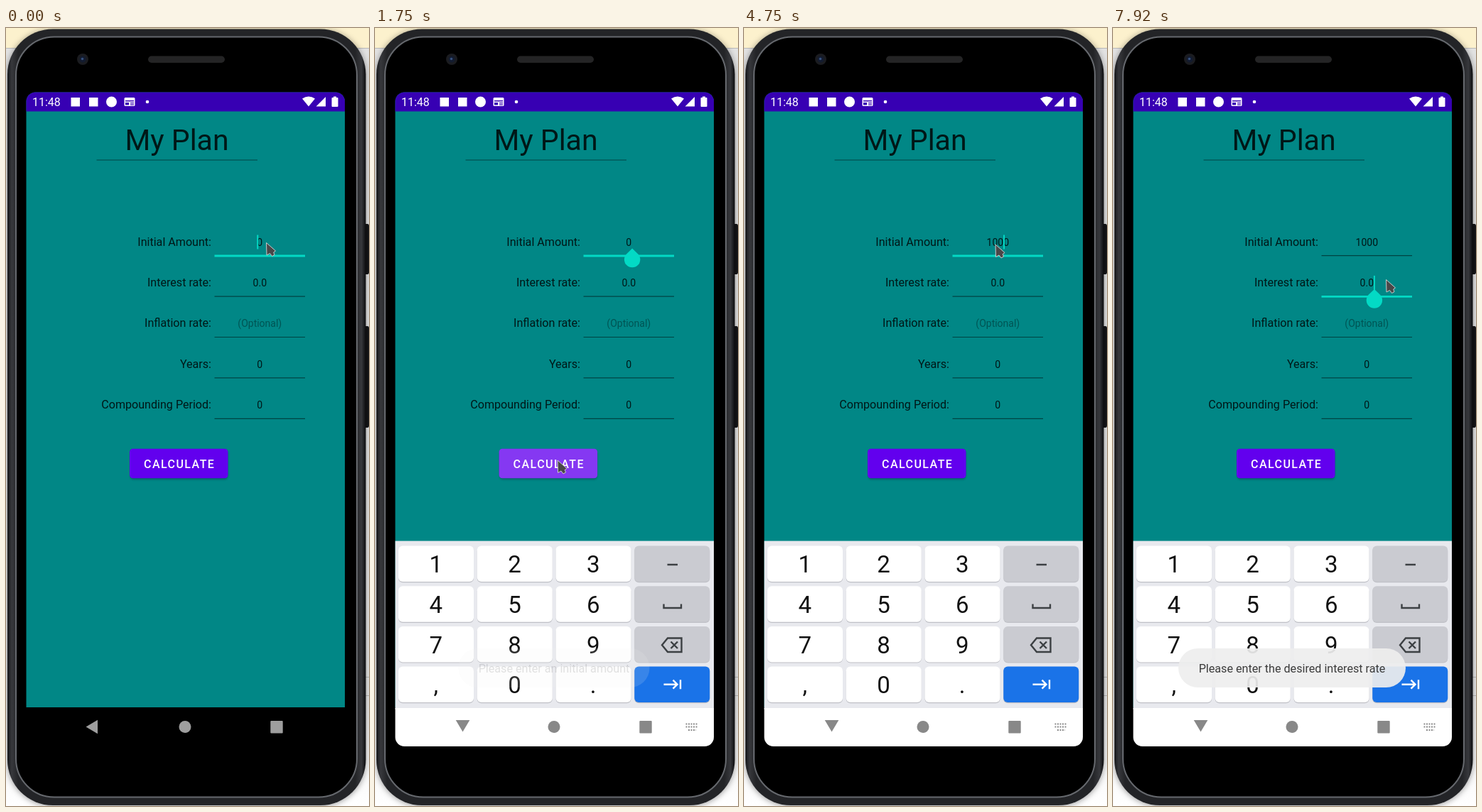
An HTML page for the animation above (8000 ms loop, 511 px wide and 1096 px high).

```html
<!DOCTYPE html>
<html lang="en">
<head>
<meta charset="utf-8">
<title>My Plan</title>
<style>
  html, body { margin: 0; width: 100%; height: 100%; overflow: hidden; background: #e9e9e9; }
  svg { display: block; width: 511px; height: 1096px; font-family: Roboto, sans-serif; }
  .mid { text-anchor: middle; }
  .end { text-anchor: end; }
  .ink { fill: #000; fill-opacity: .83; }
  .hint { fill: #000; fill-opacity: .38; }
  .rule { stroke: #000; stroke-opacity: .5; stroke-width: 1.2; }
  .line { fill: none; stroke: #3c4043; stroke-width: 2.4; }
</style>
</head>
<body>
<svg viewBox="0 0 511 1096" xmlns="http://www.w3.org/2000/svg">
  <defs>
    <clipPath id="screen"><rect x="28.5" y="90.5" width="448.5" height="921.5" rx="13"/></clipPath>
    <linearGradient id="rim" x1="0" x2="1" y1="0" y2="0">
      <stop offset="0" stop-color="#17181b"/><stop offset=".012" stop-color="#37383c"/>
      <stop offset=".03" stop-color="#232427"/><stop offset=".97" stop-color="#232427"/>
      <stop offset=".988" stop-color="#37383c"/><stop offset="1" stop-color="#0c0c0e"/>
    </linearGradient>
    <linearGradient id="page" x1="0" x2="0" y1="0" y2="1">
      <stop offset="0" stop-color="#e2e2e2"/><stop offset=".85" stop-color="#e8e8e8"/><stop offset="1" stop-color="#fff"/>
    </linearGradient>
  </defs>

  <!-- backdrop and device -->
  <rect width="511" height="1096" fill="url(#page)"/>
  <rect width="511" height="28" fill="#fcf1cd"/>
  <path d="M0 28.5H511M500 914.5H511M500 940.5H511" stroke="#b9b9b9"/>
  <path d="M504 276h5q2 0 2 3v65q0 3-2 3h-5zM504 420h5q2 0 2 3v137q0 3-2 3h-5z" fill="#151517"/>
  <rect x="2" y="1.5" width="504.5" height="1093.5" rx="64" fill="url(#rim)" style="filter:drop-shadow(0 1px 4px rgba(0,0,0,.4))"/>
  <rect x="14" y="12.5" width="480" height="1071" rx="54" stroke="#66696e" stroke-width="2"/>
  <rect x="200" y="39.5" width="108" height="9.5" rx="4.7" fill="#242425"/>
  <circle cx="108" cy="44" r="8" fill="#1b1c20"/>
  <circle cx="108" cy="44" r="4.5" fill="#131c30"/>
  <circle cx="107.5" cy="43.5" r="1.8" fill="#36517f"/>

  <g clip-path="url(#screen)">
    <rect x="28" y="90" width="450" height="867" fill="#018786"/>
    <rect x="28" y="90" width="450" height="27.5" fill="#3700b3"/>
    <g fill="#fff">
      <text x="37" y="110" font-size="16">11:48</text>
      <rect x="91.5" y="98" width="12.5" height="12.5"/>
      <rect x="117" y="98" width="12.5" height="12.5"/>
      <circle cx="148.5" cy="104" r="7.5"/>
      <path fill-rule="evenodd" d="M168 98h12q1.500 0 1.500 1.500v9q0 1.500-1.500 1.500h-12q-1.500 0-1.500-1.500v-9q0-1.500 1.500-1.500zM168 102v1.500h12V102zM168 105v3.500h5V105zM175 105v1.200h5V105zM175 107.500v1.200h5v-1.200z"/>
      <circle cx="199" cy="104" r="2.3"/>
      <path d="M417 99.5q9-6 18 0L426 110.5zM436.5 110.5L450 97v13.5z"/>
      <path d="M461 98v-1.500h4V98h1.500q1 0 1 1v11q0 1-1 1h-7q-1 0-1-1V99q0-1 1-1z"/>
    </g>

    <text class="ink mid" x="240.5" y="172" font-size="41">My Plan</text>
    <path class="rule" d="M127.500 186H354"/>
    <g id="form"></g>
    <path id="focus" d="M293.500 0H421" stroke="#03dac5" stroke-width="2.800"/>
    <rect id="caret" width="2" height="20" fill="#03dac5"/>
    <path id="handle" d="M0 0l7.900 7.700a11.200 11.200 0 1 1-15.800 0z" fill="#03dac5"/>

    <g id="button">
      <rect x="175" y="595" width="137" height="41" rx="4.5" opacity=".28" style="filter:blur(1.5px)"/>
      <rect x="174" y="592.7" width="138.5" height="41.6" rx="4.5" fill="#6200ee"/>
      <rect id="ripple" x="174" y="592.7" width="138.5" height="41.6" rx="4.5" fill="#fff"/>
      <text x="194" y="620" font-size="16" font-weight="500" letter-spacing="1.43" fill="#fff">CALCULATE</text>
    </g>

    <g id="board">
      <rect x="28" y="722.6" width="450" height="237" fill="#e8e9ee"/>
      <rect x="28" y="958" width="450" height="360" fill="#fff"/>
      <g id="keys"></g>
      <path class="line" d="M411.500 756H426M406.500 811.500v5.500H431v-5.500"/>
      <path class="line" d="M412 859.500h19.500V879H412L404 869.300zM416.500 864.500l9.500 9.500m0-9.500l-9.500 9.500"/>
      <path class="line" d="M406.500 924.700H425M419.500 918.700l6 6-6 6M430 918.200v13" style="stroke:#fff"/>
    </g>

    <g id="nav">
      <path id="back" d="M-11 0L5.500-9.800V9.800z"/>
      <circle cx="252" cy="984.5" r="8.5"/>
      <rect x="372.3" y="976" width="17.4" height="17.4" rx="1"/>
      <path id="mini" d="M437.500 980.500H455M437.500 984.500H455M441 989H452" fill="none" stroke="#8a8a8a" stroke-width="2" stroke-dasharray="2 1.500"/>
    </g>
  </g>

  <g id="toast">
    <rect id="pill" y="874" height="55" rx="27.5" fill="#eee" fill-opacity=".92"/>
    <text id="note" class="mid" x="252" y="908" font-size="16.15" fill="#3b3b3b"></text>
  </g>
  <path id="mouse" d="M0 0L.5 17.500 5 15 8 19 11.500 17 10.200 13.500 13 11.500z" fill="#4a4748" stroke="#c9cccc" stroke-linejoin="round"/>
</svg>

<script>
const LOOP = 8000, STEP = 1000 / 12, ROW = 57.4, DIGIT = 7.86;
const $ = id => document.getElementById(id);
const set = (id, attrs) => { for (const k in attrs) $(id).setAttribute(k, attrs[k]); };
const show = (id, on) => set(id, { visibility: on ? 'visible' : 'hidden' });

// progress of t from a to b, held at 0 and 1 outside
const span = (t, a, b) => Math.min(1, Math.max(0, (t - a) / (b - a)));
const ease = u => u * u * (3 - 2 * u);

const labels = ['Initial Amount:', 'Interest rate:', 'Inflation rate:', 'Years:', 'Compounding Period:'];
const values = ['0', '0.0', '(Optional)', '0', '0'];
$('form').innerHTML = labels.map((label, i) => {
  const y = 306.5 + i * ROW;
  return `<text class="ink end" x="289" y="${y}" font-size="16.100">${label}</text>
    <text id="value${i}" class="${i === 2 ? 'hint' : 'ink'} mid" x="357.300" y="${y}" font-size="14">${values[i]}</text>
    <path id="rule${i}" class="rule" d="M293.500 ${y + 14.2}H421"/>`;
}).join('');

$('keys').innerHTML = [...'123-456_789<,0.>'].map((ch, i) => {
  const col = i % 4, row = i >> 2;
  const x = 33 + col * 110.75, y = 729.5 + row * 56.7;
  const fill = col < 3 ? '#fff' : row < 3 ? '#cacbd1' : '#1a73e8';
  const box = (dy, f) => `<rect x="${x}" y="${y + dy}" width="106" height="50.500" rx="6" fill="${f}"/>`;
  const text = col < 3 ? `<text class="mid" x="${x + 52.7}" y="${y + 37.7}" font-size="33" fill="#111">${ch}</text>` : '';
  return box(1.2, '#bfc0c6') + box(0, fill) + text;
}).join('');

// pointer stops, each reached by an eased move between two times
const home = [366.5, 302.5];
const moves = [
  { from: 900, to: 1600, at: [257, 609] },
  { from: 1900, to: 3330, at: [354, 305] },
  { from: 5000, to: 5500, at: [248, 610] },
  { from: 5670, to: 6120, at: [245, 902.5] },
  { from: 6750, to: 7500, at: [384.5, 354.5] }
];
const pointer = t => moves.reduce((p, m) => {
  const u = ease(span(t, m.from, m.to));
  return p.map((v, i) => v + (m.at[i] - v) * u);
}, home);

const OPEN = 80, AGAIN = 3580, NEXT = 7580;
const strokes = [4000, 4250, 4580];
const events = [0, OPEN, AGAIN, ...strokes, NEXT];
const presses = [1583, 5583];
const notes = ['Please enter an initial amount', 'Please enter the desired interest rate'];

function drawForm(t) {
  const next = t >= NEXT;
  const typed = strokes.filter(s => s <= t).length;
  const text = '100'.slice(0, typed) + '0';
  const length = next ? 2.47 : text.length;
  const pos = next ? length : t < OPEN ? 0 : t < AGAIN ? 1 : typed;
  const x = 358.2 + DIGIT * (pos - length / 2), y = next ? ROW : 0;
  const since = t - events.filter(e => e <= t).pop();

  $('value0').textContent = text;
  show('rule0', next);
  show('rule1', !next);
  set('focus', { transform: `translate(0 ${321 + y})` });
  set('caret', { x: x - 1, y: 291.5 + y });
  show('caret', since % 1000 < 500);
  set('handle', { transform: `translate(${x} ${310.5 + y})` });
  show('handle', next || (t >= OPEN && !typed));
}

function drawBoard(t) {
  const u = span(t, OPEN, 420), open = t >= OPEN;
  show('board', open);
  set('board', { transform: `translate(0 ${290 * (1 - u) ** 3.2})` });
  set('nav', { fill: open ? '#888' : '#9e9e9e' });
  set('back', { transform: `translate(123.500 ${984.5 - 4 * u}) rotate(${-90 * u ** 1.3})` });
  set('mini', { opacity: u });
}

function drawFeedback(t) {
  const second = t > 5000;
  const press = presses[+second], begin = press + 84;
  const glow = span(t, press, press + 150) - span(t, press + 300, press + 600);
  set('ripple', { opacity: .22 * glow });
  set('button', { transform: `translate(${.6 * glow} 0)` });

  const half = second ? 160 : 134.5;
  set('toast', { opacity: span(t, begin, begin + 540) - span(t, begin + 2400, begin + 2800) });
  set('pill', { x: 252 - half, width: 2 * half });
  $('note').textContent = notes[+second];
}

function render(t) {
  drawForm(t);
  drawBoard(t);
  drawFeedback(t);
  set('mouse', { transform: `translate(${pointer(t)})` });
}

const start = performance.now();
function tick() {
  const t = (performance.now() - start) % LOOP;
  render(Math.floor((t + 4) / STEP) * STEP);
  requestAnimationFrame(tick);
}
tick();
</script>
</body>
</html>
```
